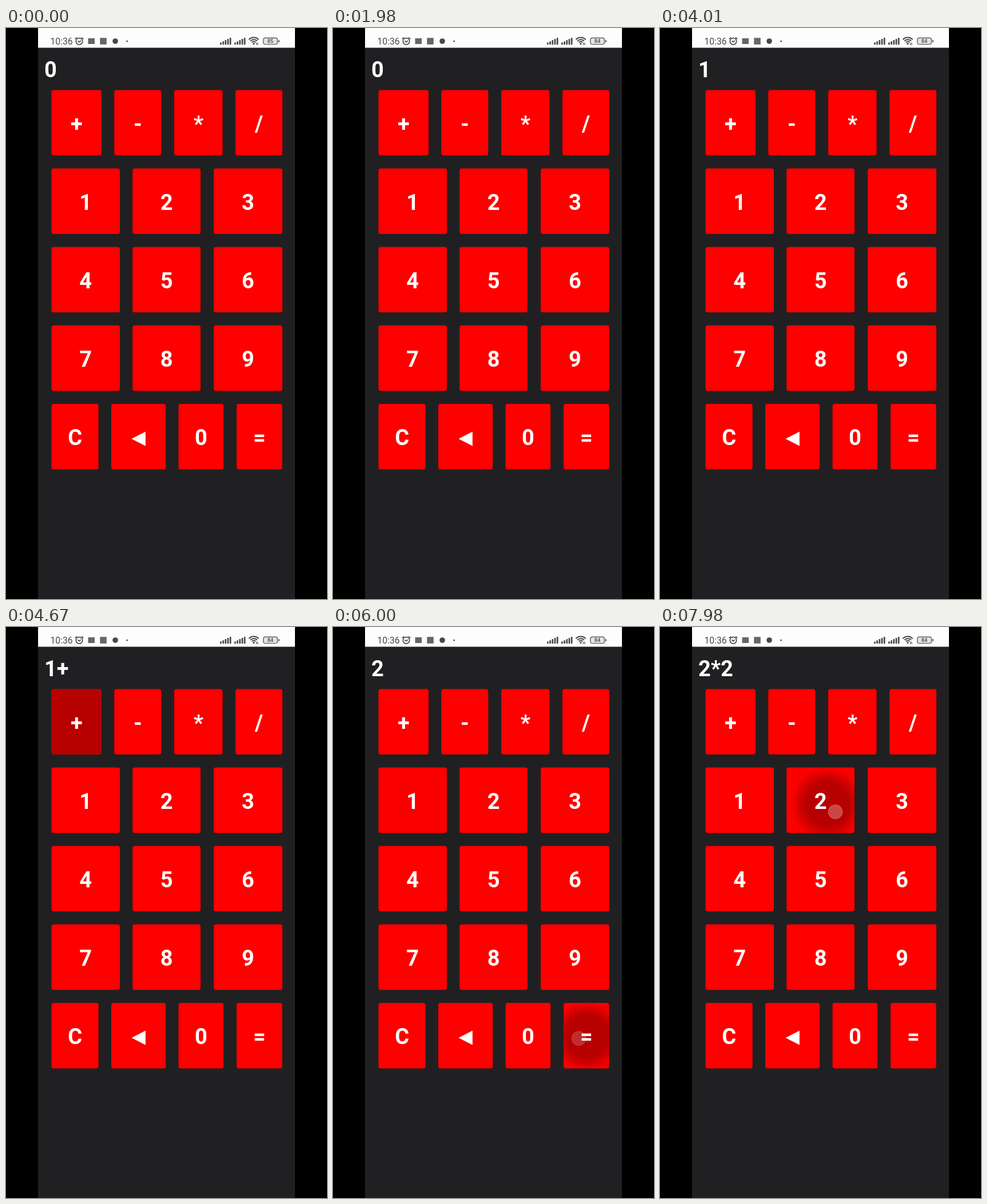
An HTML page with a canvas that plays this animation: 561 by 998 pixels, repeating every 8 s.

```html
<!DOCTYPE html>
<html lang="en">
<head>
<meta charset="utf-8">
<title>Calculator</title>
<style>
  html, body { margin: 0; width: 100%; height: 100%; overflow: hidden; background: #000; }
  canvas { display: block; width: 561px; height: 998px; }
</style>
</head>
<body>
<canvas id="stage" width="561" height="998"></canvas>
<script>
const ctx = document.getElementById('stage').getContext('2d');
const LOOP = 8000, GROW = 450, FADE = 375;
const FONT = 'Roboto, Arial, sans-serif';
const INK = '#48484a';

// Each row: top edge, then [label, left, right] per key
const three = labels => [...labels].map((s, i) => [s, [79.5, 221.2, 363][i], [199, 340, 483][i]]);
const rows = [
  [['+', 79.5, 167], ['-', 189.3, 271.3], ['*', 294, 378.5], ['/', 401, 483]],
  three('123'), three('456'), three('789'),
  [['C', 79.5, 161.7], ['◄', 184, 279.2], ['0', 301.5, 380.2], ['=', 403, 482.7]]
];
const keys = rows.flatMap((row, i) => row.map(([label, x, right]) =>
  ({ label, x, y: 108.4 + i * 137.15, w: right - x, h: 114.4 })));
const keyOf = label => keys.find(k => k.label === label);

// dot: finger position, from: where the ripple starts
const presses = [
  { at: 2405, key: '1', dot: [134, 314], from: [132, 310], shows: '1' },
  { at: 4350, key: '+', dot: [122, 176], from: [122, 174], shows: '1+' },
  { at: 5190, key: '1', dot: [130.5, 316.5], from: [107, 288], shows: '1+1' },
  { at: 5835, key: '=', dot: [429.5, 719], from: [444, 716], shows: '2' },
  { at: 7150, key: '*', dot: [338, 176], from: [337, 173], shows: '2*' },
  { at: 7840, key: '2', dot: [306.5, 323], from: [298, 313], shows: '2*2' }
];

const clamp = v => Math.max(0, Math.min(1, v));

function rect(x, y, w, h, color) {
  ctx.fillStyle = color;
  ctx.fillRect(x, y, w, h);
}

function roundPath(x, y, w, h, r) {
  ctx.beginPath();
  ctx.roundRect(x, y, w, h, r);
}

function disc(x, y, r, color) {
  ctx.beginPath();
  ctx.arc(x, y, r, 0, 7);
  ctx.fillStyle = color;
  ctx.fill();
}

function line(points) {
  ctx.beginPath();
  points.forEach(([x, y]) => ctx.lineTo(x, y));
  ctx.stroke();
}

function text(s, x, y, size, weight, color, align = 'left') {
  ctx.font = `${weight} ${size}px ${FONT}`;
  ctx.textAlign = align;
  ctx.fillStyle = color;
  ctx.fillText(s, x, y);
}

function drawAlarm(x, y) {
  ctx.lineWidth = 1.7;
  ctx.beginPath();
  ctx.arc(x, y, 5.7, 0, 7);
  ctx.stroke();
  line([[x - 2.5, y - 0.8], [x, y + 1.4], [x + 2.8, y - 1.2]]);
  line([[x - 7.3, y - 4], [x - 4, y - 6.8]]);
  line([[x + 7.3, y - 4], [x + 4, y - 6.8]]);
}

function drawSignal(x) {
  for (let i = 0; i < 5; i++) {
    const h = 4 + i * 2.1;
    roundPath(x + i * 4.2, 29.3 - h, 2.7, h, 1);
    ctx.fillStyle = INK;
    ctx.fill();
  }
}

function drawWifi(x, y) {
  ctx.lineWidth = 2.1;
  [4.4, 8, 11.7].forEach(r => {
    ctx.beginPath();
    ctx.arc(x, y, r, -Math.PI * 0.76, -Math.PI * 0.24);
    ctx.stroke();
  });
  disc(x, y - 0.6, 1.7, INK);
  rect(x + 4, y - 2.5, 1.2, 4, INK);
  rect(x + 6.3, y - 2.5, 1.2, 4, INK);
}

function drawStatus(t) {
  rect(56, 0, 449, 34.5, '#fdfdfd');
  ctx.strokeStyle = INK;
  text('10:36', 77.5, 28.6, 15.7, 400, INK);
  drawAlarm(128, 23.3);
  rect(143.5, 18, 11.5, 10, '#666668');
  rect(164.3, 17.3, 11.5, 11.5, '#666668');
  disc(191, 23, 4.8, INK);
  disc(211.5, 23.2, 1.4, INK);
  drawSignal(374);
  drawSignal(399);
  drawWifi(433, 28.2);
  roundPath(449.8, 17.3, 24.6, 11.2, 3.2);
  ctx.fillStyle = '#e4e4e6';
  ctx.fill();
  ctx.lineWidth = 1.2;
  ctx.stroke();
  rect(476, 21, 1.7, 4, INK);
  text(t < 830 ? '85' : '84', 462, 26.4, 9.4, 500, INK, 'center');
}

function drawRipple(press, age) {
  if (age < 0 || age > GROW + FADE) return;
  const key = keyOf(press.key);
  const p = clamp(age / GROW);
  const r = Math.hypot(key.w, key.h) / 2 * (1 - (1 - p) ** 3) * 1.15 + 1;
  const x = press.from[0] + (key.x + key.w / 2 - press.from[0]) * p;
  const y = press.from[1] + (key.y + key.h / 2 - press.from[1]) * p;
  const alpha = 0.28 * clamp(age / 75) * (1 - clamp((age - GROW) / FADE));
  const shade = ctx.createRadialGradient(x, y, 0, x, y, r);
  shade.addColorStop(Math.min(1, 0.38 + 0.62 * p), `rgba(0,0,0,${alpha})`);
  shade.addColorStop(1, `rgba(0,0,0,${alpha * p ** 3})`);
  ctx.save();
  roundPath(key.x, key.y, key.w, key.h, 4);
  ctx.clip();
  rect(key.x, key.y, key.w, key.h, shade);
  ctx.restore();
}

function drawDot(press, age) {
  const a = clamp((age + 60) / 40) * (1 - clamp((age - 150) / 45));
  if (a <= 0) return;
  const [x, y] = press.dot;
  ctx.save();
  ctx.globalAlpha = a;
  disc(x, y, 12.6, 'rgba(255,255,255,0.27)');
  ctx.lineWidth = 1.4;
  ctx.strokeStyle = 'rgba(255,255,255,0.13)';
  ctx.beginPath();
  ctx.arc(x, y, 12, 0, 7);
  ctx.stroke();
  ctx.restore();
}

function drawLabel({ label, x, y, w }) {
  const cx = x + w / 2;
  if (label === '◄') {
    ctx.beginPath();
    ctx.moveTo(219.5, 718);
    ctx.lineTo(243.8, 705.5);
    ctx.lineTo(243.8, 730.5);
    ctx.fillStyle = '#fff';
    ctx.fill();
  } else {
    text(label, cx, y + 72.4, 38, 700, '#fff', 'center');
  }
}

function draw(t) {
  rect(0, 0, 561, 998, '#000');
  rect(56, 34, 449, 964, '#202022');
  drawStatus(t);
  const last = presses.filter(p => t >= p.at + 70).pop();
  text(last ? last.shows : '0', 67, 86.3, 38, 700, '#fff');
  for (const k of keys) {
    roundPath(k.x, k.y, k.w, k.h, 4);
    ctx.fillStyle = '#fe0000';
    ctx.fill();
  }
  presses.forEach(p => drawRipple(p, t - p.at));
  keys.forEach(drawLabel);
  presses.forEach(p => drawDot(p, t - p.at));
}

const start = performance.now();
function tick() {
  draw((performance.now() - start) % LOOP);
  requestAnimationFrame(tick);
}
tick();
</script>
</body>
</html>
```
